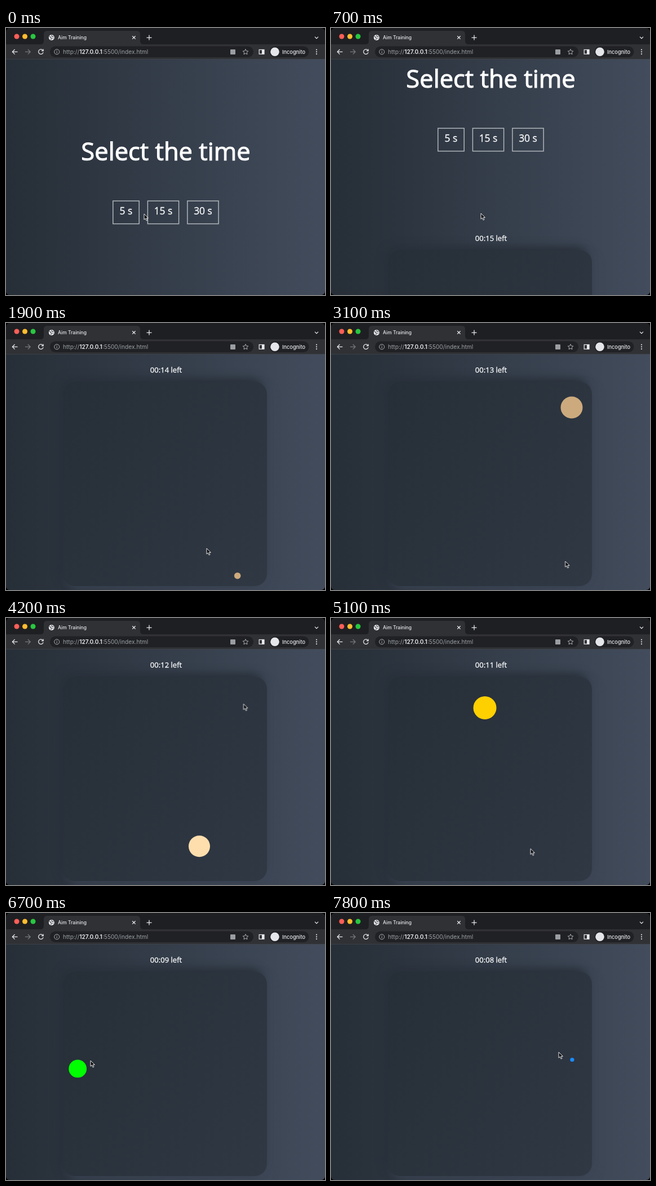
Recreate the animation shown at these times as an HTML page. Size 566 by 474 pixels, loop 8 s.

```html
<!DOCTYPE html>
<html lang="en">
<head>
<meta charset="utf-8">
<title>Aim Training</title>
<style>
  html, body { margin: 0; width: 100%; height: 100%; overflow: hidden; background: #000; }
  .window {
    position: relative; width: 566px; height: 474px;
    overflow: hidden; border-radius: 7px; background: #1e1f22;
  }
  svg { position: absolute; left: 0; top: 0; display: block; }
  .chrome text { font-family: Inter, Roboto, sans-serif; fill: #e8eaed; }

  .page {
    position: absolute; left: 0; top: 55px; width: 566px; height: 419px;
    overflow: hidden; color: #fff; fill: #fff;
    font-family: "Open Sans", "Noto Sans", sans-serif;
    background: linear-gradient(90deg, #262e37, #424c5c);
  }
  .screen { position: relative; width: 566px; height: 419px; }
  .title { font-size: 43.56px; stroke: #fff; stroke-width: 1.1px; }
  .time { font-size: 17.4px; }
  .time text { stroke: #fff; stroke-width: .3px; }
  .time rect { fill: none; stroke: #b4b9be; stroke-width: 1.45px; }
  .middle { text-anchor: middle; }

  .timer {
    position: absolute; left: 1px; top: 18px; width: 566px; height: 20px;
    overflow: hidden; text-align: center; font-size: 13.07px; line-height: 20px;
    -webkit-text-stroke: .3px #fff;
  }
  .board {
    position: absolute; left: 101px; top: 49px; width: 362px; height: 363px;
    border-radius: 22px;
    background: linear-gradient(118.38deg, #262e37, #303844);
    box-shadow: -6px -6px 14.5px #28303a, 7px 5px 14.5px #3f4858;
  }

  .pages, .ticks, .target, .cursor { animation: 8s step-end infinite; }
  .pages { animation-name: scroll; }
  .ticks { animation-name: tick; }
  .target { animation-name: target; }
  .cursor { animation-name: cursor; }

  /* 500 ms ease-out, sampled every 100 ms */
  @keyframes scroll {
    0% { transform: translateY(0); }
    8.75% { transform: translateY(-129px); }
    10% { transform: translateY(-239px); }
    11.25% { transform: translateY(-329px); }
    12.5% { transform: translateY(-393px); }
    13.75%, 100% { transform: translateY(-419px); }
  }
  @keyframes tick {
    0% { transform: translateY(0); }
    20% { transform: translateY(-20px); }
    32.5% { transform: translateY(-40px); }
    45% { transform: translateY(-60px); }
    57.5% { transform: translateY(-80px); }
    71.25% { transform: translateY(-100px); }
    82.5% { transform: translateY(-120px); }
    95%, 100% { transform: translateY(-140px); }
  }
  @keyframes target {
    0% { cx: 410.7px; cy: 448.7px; r: 5.8px; fill: #cdaa7d; }
    37.5% { cx: 427px; cy: 150px; r: 19.5px; fill: #cdaa7d; }
    50% { cx: 343px; cy: 405.3px; r: 19px; fill: #ffdead; }
    63.75% { cx: 273px; cy: 159.4px; r: 20.5px; fill: #ffd000; }
    75% { cx: 127.2px; cy: 276.4px; r: 15.9px; fill: #0f0; }
    88.75%, 100% { cx: 427.9px; cy: 260.5px; r: 3.6px; fill: #1a8cff; }
  }
  /* the pointer moves at 10 steps a second */
  @keyframes cursor {
    0% { transform: translate(245px, 330px); animation-timing-function: steps(5); }
    6.25% { transform: translate(266px, 329px); }
    18.75% { transform: translate(266px, 329px); animation-timing-function: steps(4); }
    23.75% { transform: translate(356px, 400px); animation-timing-function: steps(2); }
    26.25% { transform: translate(406px, 435px); }
    27.5% { transform: translate(406px, 435px); animation-timing-function: steps(2); }
    30% { transform: translate(423px, 447px); animation-timing-function: steps(4); }
    35% { transform: translate(411px, 447px); }
    36.25% { transform: translate(411px, 447px); animation-timing-function: steps(3); }
    40% { transform: translate(418px, 411px); }
    41.25% { transform: translate(418px, 411px); animation-timing-function: steps(5); }
    47.5% { transform: translate(426px, 165px); animation-timing-function: steps(2); }
    50% { transform: translate(423px, 148px); }
    52.5% { transform: translate(421.5px, 152.5px); animation-timing-function: steps(2); }
    55% { transform: translate(370px, 411px); }
    56.25% { transform: translate(370px, 411px); animation-timing-function: steps(4); }
    61.25% { transform: translate(369px, 420px); }
    63.75% { transform: translate(354px, 409.5px); }
    66.25% { transform: translate(354px, 409px); animation-timing-function: steps(2); }
    68.75% { transform: translate(325.5px, 252.5px); }
    70% { transform: translate(325.5px, 252.5px); animation-timing-function: steps(4); }
    75% { transform: translate(278px, 165px); animation-timing-function: steps(2); }
    77.5% { transform: translate(262px, 172px); }
    80% { transform: translate(262px, 172px); animation-timing-function: steps(3); }
    83.75% { transform: translate(150px, 262px); animation-timing-function: steps(4); }
    88.75% { transform: translate(135.5px, 271px); }
    92.5% { transform: translate(135.5px, 271px); animation-timing-function: steps(4); }
    97.5%, 100% { transform: translate(404px, 247px); }
  }
</style>
</head>
<body>
<div class="window">
  <svg class="chrome" width="566" height="56" viewBox="0 0 566 56">
    <circle cx="19" cy="15" r="4.5" fill="#ff5f57"/>
    <circle cx="33.5" cy="15" r="4.5" fill="#febc2e"/>
    <circle cx="48" cy="15" r="4.5" fill="#28c840"/>
    <path d="M0 29H61q6 0 6-6V11q0-6 6-6H232q6 0 6 6V23q0 6 6 6H566V56H0Z" fill="#303135"/>
    <rect x="78" y="32.5" width="361" height="19.5" rx="9.75" fill="#202124"/>
    <rect x="467.5" y="32.5" width="70" height="19.5" rx="9.75" fill="#202124"/>

    <circle cx="80.8" cy="17" r="5" fill="#e8eaed"/>
    <path d="M77 15l2.4 1.5 1.2 2-1 2.2M80.5 12.8l1 2 2.8 .6M82 18.2l2-.2" fill="none" stroke="#303135" stroke-width="1.1"/>
    <text x="92" y="20.2" font-size="8.5" font-weight="500">Aim Training</text>

    <g fill="none" stroke="#e8eaed" stroke-width="1.25">
      <path d="M224.2 14.2l5.4 5.4m0-5.4l-5.4 5.4M249.5 17h9M254 12.5v9M548 15.6l3 3 3-3"/>
      <path d="M20.5 42.3H11.5M15.6 38l-4.3 4.3 4.3 4.3"/>
      <path d="M34 42.3H43M38.9 38l4.3 4.3-4.3 4.3" stroke="#75787c"/>
      <path d="M65.4 39.6a4.3 4.3 0 1 0 .7 3.6M66.2 37.4v3.2H63"/>
      <g stroke="#aeb1b5" stroke-width="1">
        <circle cx="90.2" cy="42.3" r="4.5"/>
        <path d="M90.2 41.6v3.1M90.2 39.6v1.1"/>
        <path d="M425 37.6l1.4 3.1 3.4.4-2.5 2.3.7 3.3-3-1.7-3 1.7.7-3.3-2.5-2.3 3.4-.4Z"/>
      </g>
      <rect x="449.2" y="38.5" width="8.8" height="7.7"/>
    </g>
    <rect x="398" y="38" width="9" height="9" rx="1" fill="#9a9da1"/>
    <path d="M454 38.5h4v7.7h-4Z" fill="#e8eaed"/>
    <circle cx="477" cy="42.3" r="7.8" fill="#e4e6e9"/>
    <g fill="#e8eaed">
      <circle cx="551" cy="38.5" r="1.1"/><circle cx="551" cy="42.3" r="1.1"/><circle cx="551" cy="46.1" r="1.1"/>
    </g>
    <text x="101" y="46" font-size="10.2" style="fill:#9aa0a6">http://<tspan fill="#e8eaed" font-weight="600">127.0.0.1</tspan>:5500/index.html</text>
    <text x="490" y="45.6" font-size="9.2" font-weight="500">Incognito</text>
  </svg>

  <div class="page">
    <div class="pages">
      <div class="screen">
        <svg width="566" height="419" viewBox="0 55 566 419">
          <text class="title middle" x="283.5" y="234.5">Select the time</text>
          <g class="time middle">
            <rect x="189.8" y="307" width="46.4" height="40.6"/><text x="213" y="331.2">5 s</text>
            <rect x="251.4" y="307" width="55.2" height="40.6"/><text x="279" y="331.2">15 s</text>
            <rect x="321.9" y="307" width="55.2" height="40.6"/><text x="349.5" y="331.2">30 s</text>
          </g>
        </svg>
      </div>
      <div class="screen">
        <div class="board"></div>
        <div class="timer"><div class="ticks">
          00:15 left<br>00:14 left<br>00:13 left<br>00:12 left<br>
          00:11 left<br>00:10 left<br>00:09 left<br>00:08 left
        </div></div>
        <svg width="566" height="419" viewBox="0 55 566 419"><circle class="target"/></svg>
      </div>
    </div>
  </div>
  <svg width="566" height="56" viewBox="0 0 566 56"><path d="M0 55.4H566" stroke="#43474d" stroke-width=".8"/></svg>
  <svg width="566" height="474" viewBox="0 0 566 474">
    <path class="cursor" d="M0 0V10.2L2.4 8 4.1 12 5.9 11.2 4.2 7.4H7.4Z" fill="#0c0d0f" stroke="#fff" stroke-width=".9" stroke-linejoin="round"/>
  </svg>
</div>
</body>
</html>
```
